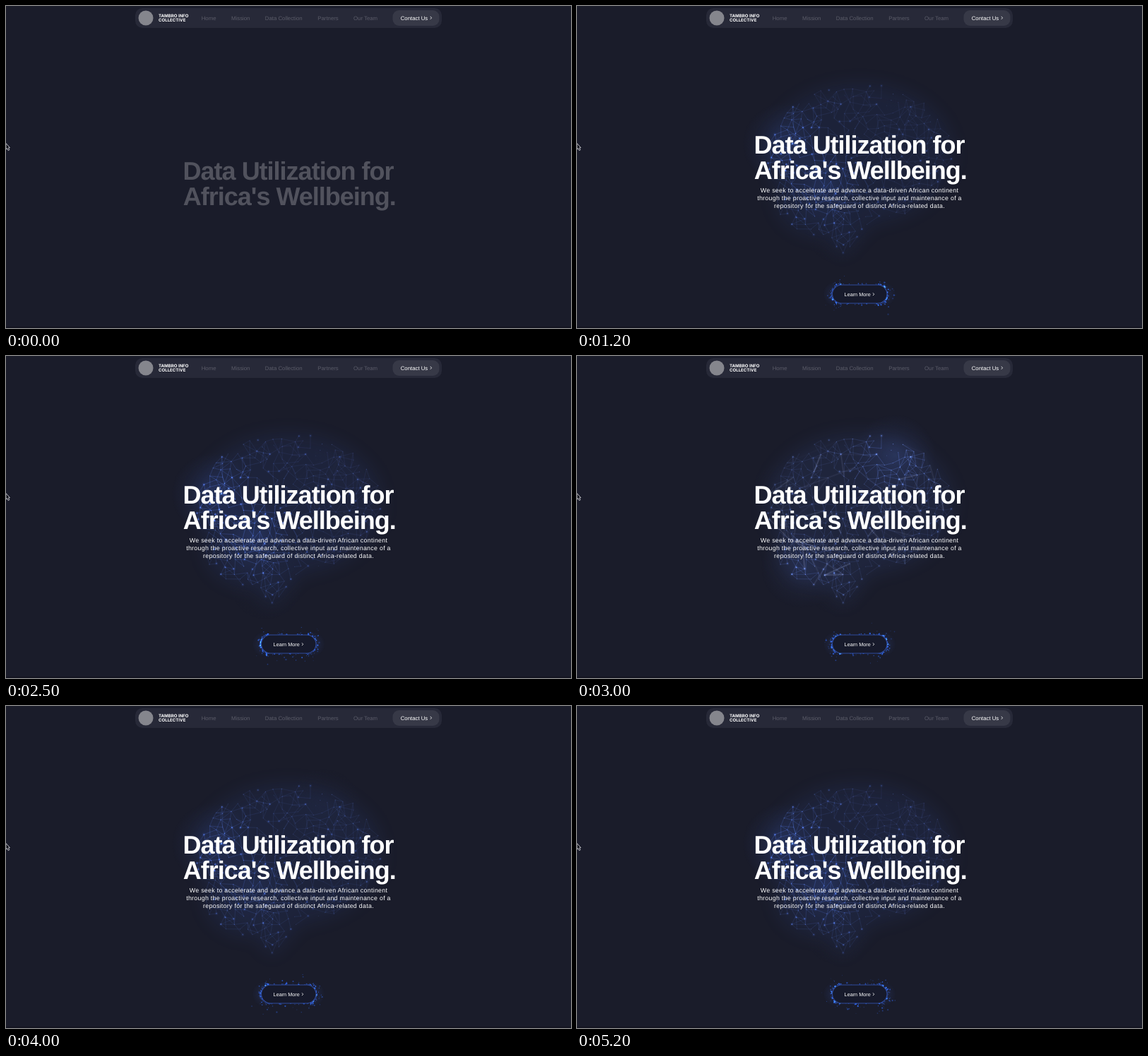
An HTML page with a canvas that plays this animation: 800x456 px, repeating every 5.3 s.

```html
<!DOCTYPE html>
<html lang="en">
<head>
<meta charset="utf-8">
<title>Data Utilization</title>
<style>
  html, body { margin: 0; width: 100%; height: 100%; overflow: hidden; background: #1a1c2a; }
  canvas, svg { position: absolute; left: 0; top: 0; width: 800px; height: 456px; display: block; }
  text { font-family: "Liberation Sans", Arial, sans-serif; fill: #fff; text-rendering: geometricPrecision; white-space: pre; }
  .brand { font: 700 6.1px Inter, sans-serif; }
  .nav { font-size: 7.8px; }
  .nav .dim { fill: #5b5c69; }
  .title { font-size: 36px; font-weight: 700; letter-spacing: -1px; }
  .lead { font-size: 8.8px; letter-spacing: .3px; text-anchor: middle; }
  .chevron { fill: none; stroke: #fff; stroke-width: .8; }
</style>
</head>
<body>
<canvas id="stage" width="800" height="456"></canvas>
<svg viewBox="0 0 800 456">
  <rect y="454" width="800" height="2" fill="#141521"/>
  <g class="nav">
    <rect x="183" y="3" width="434" height="28" rx="10" fill="#272938"/>
    <circle cx="198" cy="17" r="10.5" fill="#85868d"/>
    <text class="brand" x="216" y="16.2">TAMBRO INFO</text>
    <text class="brand" x="216" y="22">COLLECTIVE</text>
    <text class="dim" x="276.7" y="19.5">Home</text>
    <text class="dim" x="319" y="19.5">Mission</text>
    <text class="dim" x="366.8" y="19.5">Data Collection</text>
    <text class="dim" x="441.3" y="19.5">Partners</text>
    <text class="dim" x="492" y="19.5">Our Team</text>
    <rect x="547.5" y="6" width="66" height="22" rx="9" fill="#373947"/>
    <text x="558.7" y="19.6">Contact Us</text>
    <path class="chevron" d="M600.8 14.8l1.8 2-1.8 2"/>
  </g>
  <g id="title" class="title">
    <text x="250.6" y="208.7">Data Utilization for</text>
    <text x="250.8" y="244.9">Africa's Wellbeing.</text>
  </g>
  <g id="lead" class="lead">
    <text x="400" y="264">We seek to accelerate and advance a data-driven African continent</text>
    <text x="400" y="275">through the proactive research, collective input and maintenance of a</text>
    <text x="400" y="286">repository for the safeguard of distinct Africa-related data.</text>
  </g>
  <g id="button">
    <rect x="361.5" y="395" width="77.5" height="26" rx="13" fill="#171a2b" stroke="#2f4b9c" stroke-width="1.1"/>
    <text x="378.6" y="410.8" font-size="7.25">Learn More</text>
    <path class="chevron" d="M419 406.3l1.7 1.9-1.7 1.9"/>
  </g>
  <path d="M0 194.5v8.6l1.7-1.5 1.4 2.9 1.7-.8-1.4-2.8 2-.3z" fill="#10111a" stroke="#e8e8ec" stroke-width=".8"/>
</svg>
<script>
const LOOP = 5300, STEP = 100, PULSE = 1333, PULSE_START = 1200, FLASH = .58;
const ctx = document.getElementById('stage').getContext('2d');
const [title, lead, button] = ['title', 'lead', 'button'].map(id => document.getElementById(id));

const rnd = n => { const v = Math.sin(n * 127.1 + 11.7) * 43758.5453; return v - Math.floor(v); };
const ramp = (t, from, to) => Math.min(1, Math.max(0, (t - from) / (to - from)));
const smooth = u => u * u * (3 - 2 * u);
const dist = (a, b) => Math.hypot(a.x - b.x, a.y - b.y);

const BLUE = [72, 112, 232], PALE = [172, 182, 220];
const rgba = (c, a) => `rgba(${c},${Math.min(1, a).toFixed(3)})`;
const blend = u => BLUE.map((v, i) => Math.round(v + (PALE[i] - v) * Math.min(1, u)));

// Closeness of a cyclic phase to its peak, 0 to 1
function pulse(phase, peak, width = .2) {
  const d = Math.abs(phase - peak);
  return Math.exp(-((Math.min(d, 1 - d) / width) ** 2));
}

const brain = new Path2D();
brain.ellipse(400, 209, 132, 99, 0, 0, 7);
brain.closePath();
brain.ellipse(345, 272, 64, 54, 0, 0, 7);
brain.closePath();
brain.moveTo(335, 300);
brain.lineTo(425, 300);
brain.lineTo(376, 354);

// Centres that light up in turn
const centres = [
  { x: 292, y: 195, peak: 0 },
  { x: 450, y: 140, peak: .4 },
  { x: 318, y: 300, peak: .5 },
  { x: 425, y: 210, peak: .62 },
  { x: 368, y: 322, peak: .68 },
  { x: 350, y: 255, peak: .95 }
];
const activity = (p, phase) => centres.reduce((sum, c) =>
  sum + pulse(phase, c.peak) * Math.exp(-((dist(p, c) / 55) ** 2)), 0);

const nodes = [], links = [], streaks = [];
for (let i = 0; i < 2500; i++) {
  const n = { x: 266 + 268 * rnd(i * 2), y: 109 + 245 * rnd(i * 2 + 1), size: .4 + .7 * rnd(i + 900) ** 3 };
  if (ctx.isPointInPath(brain, n.x, n.y) && nodes.every(m => dist(m, n) > 8)) nodes.push(n);
}
nodes.forEach((a, i) => nodes.slice(i + 1).forEach((b, j) => {
  const d = dist(a, b), luck = rnd(i * 31 + j);
  const link = { a, b, x: (a.x + b.x) / 2, y: (a.y + b.y) / 2 };
  if (d < 22 && luck < .4) links.push(link);
  else if (d > 25 && d < 45 && luck < .018) streaks.push({ ...link, peak: .4 + .35 * rnd(i + 70) });
}));

function glow(x, y, r, color, alpha) {
  const g = ctx.createRadialGradient(x, y, 0, x, y, r);
  g.addColorStop(0, rgba(color, alpha));
  g.addColorStop(.5, rgba(color, alpha * .4));
  g.addColorStop(1, rgba(color, 0));
  ctx.fillStyle = g;
  ctx.fillRect(x - r, y - r, r * 2, r * 2);
}

function line({ a, b }, style, width) {
  ctx.strokeStyle = style;
  ctx.lineWidth = width;
  ctx.beginPath();
  ctx.moveTo(a.x, a.y);
  ctx.lineTo(b.x, b.y);
  ctx.stroke();
}

function dot(x, y, r, style) {
  ctx.fillStyle = style;
  ctx.beginPath();
  ctx.arc(x, y, r, 0, 7);
  ctx.fill();
}

function drawBrain(t) {
  const phase = (((t - PULSE_START) / PULSE) % 1 + 1) % 1;
  const flash = pulse(phase, FLASH);
  ctx.globalAlpha = smooth(ramp(t, 100, 1500));

  ctx.filter = 'blur(12px)';
  ctx.fillStyle = rgba(blend(flash * .5), .09 + .03 * flash);
  ctx.fill(brain);
  ctx.filter = 'none';
  for (const c of centres) glow(c.x, c.y, 58, blend(flash * .6), .17 * pulse(phase, c.peak));

  for (const l of links)
    line(l, rgba(blend(.1 + .6 * flash), .13 + .08 * flash + .25 * activity(l, phase)), .6);
  for (const n of nodes) {
    const level = activity(n, phase);
    dot(n.x, n.y, n.size, rgba(blend(.25 + .5 * flash), .28 + .3 * level));
    if (n.size > .7) glow(n.x, n.y, 3, blend(flash), .15 + .2 * level);
  }
  for (const s of streaks) {
    const v = pulse(phase, s.peak, .13);
    line(s, rgba(PALE, .08 * v), 3);
    line(s, rgba(PALE, .24 * v), 1);
  }
}

function drawSparks(t) {
  ctx.globalAlpha = ramp(t, 100, 600);
  for (let i = 0; i < 150; i++) {
    const life = 450 + 500 * rnd(i + 50), clock = t / life + rnd(i + 250);
    const age = clock % 1, seed = i * 17 + Math.floor(clock) * 691;
    const [side, flat, turn, speed, along, size] = [1, 2, 3, 4, 5, 6].map(k => rnd(seed + k));
    const onEdge = flat < .2;
    const angle = onEdge ? Math.sign(turn - .5) * Math.PI / 2 : (turn - .5) * Math.PI;
    const reach = 13 + age * (2 + 18 * speed ** 4);
    const x = 400.2 + Math.sign(side - .5) * ((onEdge ? 26 * along : 26) + reach * Math.cos(angle));
    dot(x, 408 + reach * Math.sin(angle), .45 + .8 * size ** 2, rgba([48, 104, 245], 1 - age * .75));
  }
  for (const x of [366, 434]) glow(x, 408, 18, BLUE, .2);
}

function draw(t) {
  ctx.globalCompositeOperation = 'source-over';
  ctx.globalAlpha = 1;
  ctx.clearRect(0, 0, 800, 456);
  ctx.globalCompositeOperation = 'lighter';
  drawBrain(t);
  drawSparks(t);

  const rise = smooth(ramp(t, 0, 600));
  title.setAttribute('transform', `translate(0 ${(37 * (1 - rise)).toFixed(2)})`);
  title.setAttribute('opacity', .24 + .76 * ramp(t, 0, 450));
  lead.setAttribute('opacity', ramp(t, 200, 650));
  button.setAttribute('opacity', ramp(t, 100, 600));
}

let shown = -1;
const start = performance.now();
function tick() {
  const t = Math.floor(((performance.now() - start) % LOOP) / STEP) * STEP;
  if (t !== shown) draw(shown = t);
  requestAnimationFrame(tick);
}
tick();
</script>
</body>
</html>
```
